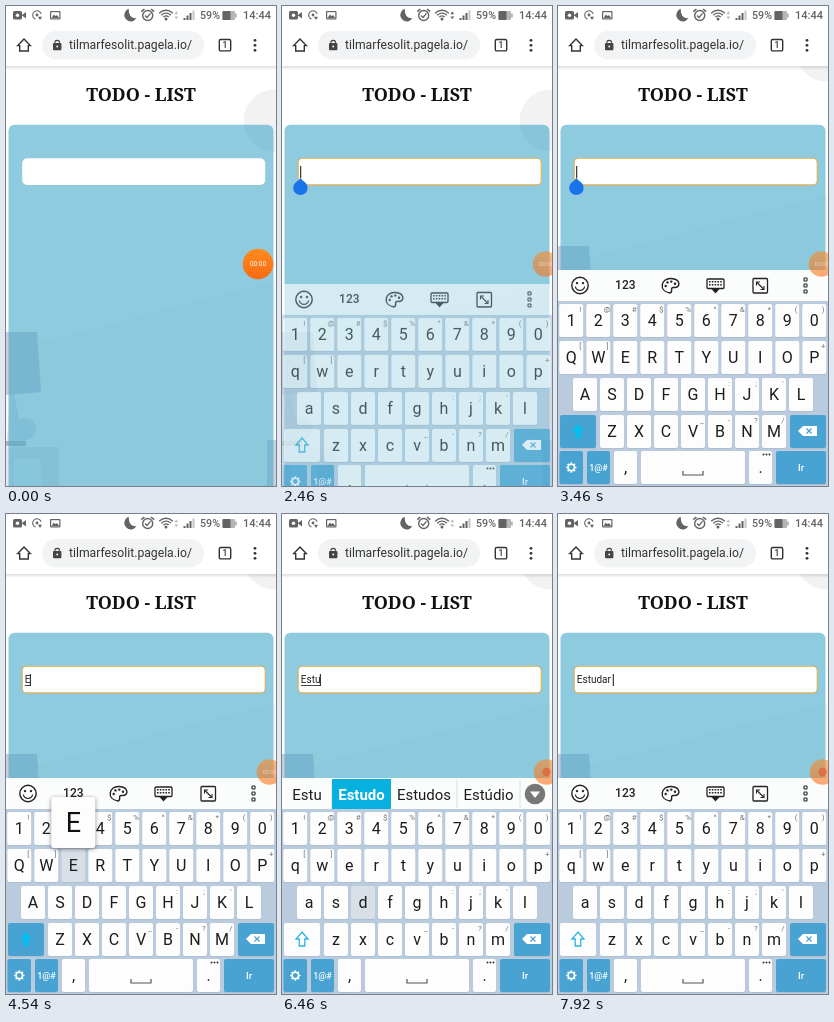
Recreate the animation shown at these times as an HTML page with a canvas. Size 270 px wide and 480 px high, loop 8 s.

```html
<!DOCTYPE html>
<html lang="pt">
<head>
<meta charset="utf-8">
<style>
html,body{margin:0;width:100%;height:100%;overflow:hidden;background:#fff}
canvas{display:block;width:270px;height:480px}
</style>
</head>
<body>
<canvas id="stage"></canvas>
<script>
const LOOP = 8000, W = 270, H = 480;
const dpr = window.devicePixelRatio || 1;
const cv = document.getElementById('stage');
const layer = document.createElement('canvas');
for (const k of [cv, layer]) { k.width = W * dpr; k.height = H * dpr; }
const main = cv.getContext('2d'), panel = layer.getContext('2d');
let c = main;

const SANS = 'Roboto, sans-serif', SERIF = '"Noto Serif", serif';
const BLUE = '#48a3d3', CYAN = '#06b1e0', GREY = '#636363', INK = '#1d1d1d';
const KEY = '#fdfdfd', PRESSED = '#d9dfe6';

// key, finger down, letter typed, finger up
const taps = [
  ['e', 4150, 4380, 4690], ['s', 5000, 5150, 5380], ['t', 5690, 5770, 5930],
  ['u', 6000, 6080, 6230], ['d', 6460, 6540, 6700], ['a', 6920, 7000, 7230],
  ['r', 7310, 7380, 7540], [' ', 7610, 7690, 7850]
];
// start time, words, cell edges, highlighted cell
const hints = [
  [4610, ['E', 'É', 'Eu', 'Em', 'Ele', 'Ela'], [0, 34, 68, 108, 150, 193, 238], 0],
  [5380, ['Es', 'És', 'Este', 'Esta', 'Está', 'Esse'], [0, 36, 72, 113, 154, 195, 238], 0],
  [6000, ['Est', 'Este', 'Esta', 'Está', 'Estou'], [0, 43, 90, 137, 184, 238], 1],
  [6310, ['Estu', 'Estudo', 'Estudos', 'Estúdio'], [0, 50, 109, 175, 238], 1],
  [6770, ['Estud', 'Estudo', 'Estudos', 'Estúdio'], [0, 50, 109, 175, 238], 1],
  [7230, ['Estuda', 'Estudar', 'Estudam'], [0, 76, 157, 238], 0],
  [7600, ['Estudar', 'Estudaram', 'Estudará'], [0, 72, 157, 238], 0]
];
const TOOLS_BACK = 7770;

const clamp = x => Math.max(0, Math.min(1, x));
const ramp = (t, a, b) => clamp((t - a) / (b - a));
const easeOut = p => 1 - (1 - p) * (1 - p);

function rect(x, y, w, h, col) { c.fillStyle = col; c.fillRect(x, y, w, h); }
function round(x, y, w, h, r, col) {
  c.beginPath(); c.roundRect(x, y, w, h, r); c.fillStyle = col; c.fill();
}
function frame(x, y, w, h, r, col, lw) {
  c.beginPath(); c.roundRect(x, y, w, h, r);
  c.strokeStyle = col; c.lineWidth = lw; c.stroke();
}
function disc(x, y, r, col) {
  c.beginPath(); c.arc(x, y, r, 0, 7); c.fillStyle = col; c.fill();
}
function ring(x, y, r, col, lw, a = 0, b = Math.PI * 2) {
  c.beginPath(); c.arc(x, y, r, a, b);
  c.strokeStyle = col; c.lineWidth = lw; c.stroke();
}
function path(pts, close) {
  c.beginPath();
  for (let i = 0; i < pts.length; i += 2) c.lineTo(pts[i], pts[i + 1]);
  if (close) c.closePath();
}
function poly(pts, col) { path(pts, true); c.fillStyle = col; c.fill(); }
function line(pts, col, lw, close) {
  path(pts, close); c.strokeStyle = col; c.lineWidth = lw; c.stroke();
}
function text(s, x, y, size, col, align = 'center', family = SANS, weight = 400) {
  c.font = `${weight} ${size}px ${family}`;
  c.textAlign = align; c.fillStyle = col; c.fillText(s, x, y);
}

function statusBar(t) {
  round(7, 5, 9, 8.5, 1.5, GREY);
  poly([16, 9, 20, 6, 20, 12.5, 16, 9.6], GREY);
  disc(11.5, 9.2, 1.7, '#fff');
  ring(31, 9, 4.3, GREY, 1.1, 1.9, 6);
  disc(31, 9, 1.4, GREY);
  poly([32, 10.8, 36, 10.8, 34, 14], GREY);
  round(44, 5, 10.5, 8.5, 1, GREY);
  rect(45.2, 6.2, 8.1, 6.1, '#fff');
  poly([45.5, 12, 48, 8.5, 49.7, 10.3, 51, 9, 53.2, 12], GREY);

  c.beginPath(); c.arc(124.8, 9, 6.5, -1.9, 0.5, true);
  c.quadraticCurveTo(122.5, 12.5, 122.7, 2.9); c.fillStyle = GREY; c.fill();
  ring(141.7, 9.5, 5, GREY, 1.4);
  line([139, 9.5, 141, 11.5, 144.5, 7.3], GREY, 1.3);
  line([135.3, 5.6, 138.4, 3], GREY, 1.6);
  line([148.1, 5.6, 145, 3], GREY, 1.6);
  for (const r of [3.6, 6.4, 9.2]) ring(160, 13.5, r, GREY, 1.4, -2.4, -0.74);
  disc(160, 13, 1.5, GREY);
  const busy = t >= 380 && t < 3380 ? '#666' : '#bbb';
  poly([168.4, 8.2, 170.3, 5.3, 172.2, 8.2], busy);
  poly([168.4, 10.4, 170.3, 13.3, 172.2, 10.4], busy);
  for (let i = 0; i < 4; i++)
    rect(177.5 + i * 3, 12 - i * 2.5, 2, 2 + i * 2.5, i < 3 ? GREY : '#c4c4c4');
  text('59%', 194, 13.4, 10.7, GREY, 'left', SANS, 500);
  round(216.5, 5, 12.5, 9, 1, '#b5b5b5');
  round(216.5, 5, 8, 9, 1, GREY);
  rect(229, 7.5, 1.8, 4, '#b5b5b5');
  text('14:44', 237, 13.4, 11, GREY, 'left', SANS, 500);
}

function addressBar() {
  line([18, 33, 24.3, 39.6, 22.3, 39.6, 22.3, 45, 13.7, 45, 13.7, 39.6, 11.7, 39.6], '#333', 1.4, true);
  round(36, 25, 162, 28.5, 14.2, '#f1f3f4');
  round(47, 37, 8.4, 7.2, 1, '#444');
  ring(51.2, 36.8, 2.4, '#444', 1.2, Math.PI, 0);
  disc(51.2, 40.6, 1, '#f1f3f4');
  c.save();
  c.beginPath(); c.rect(60, 25, 132, 28); c.clip();
  text('tilmarfesolit.pagela.io/', 63, 43.4, 12.2, '#333', 'left');
  c.restore();
  frame(213.3, 33.5, 11.4, 11.4, 1.5, '#333', 1.4);
  text('1', 219, 42.2, 8.5, '#333', 'center', SANS, 500);
  for (const y of [34.3, 39.3, 44.3]) disc(249, y, 1.4, '#333');
}

function room(dy) {
  c.save(); c.translate(0, dy);
  poly([0, 345, 270, 275, 270, 580, 0, 580], '#fafafc');
  rect(0, 441, 53, 130, '#e6e8ed');
  rect(8, 453, 27, 118, '#f2f5f7');
  poly([4, 388, 8, 388, 18, 436, 1, 436], '#dee1e8');
  c.beginPath(); c.ellipse(19, 423, 11, 11, 0, 0, 7); c.fillStyle = '#dee1e8'; c.fill();
  poly([0, 326, 31, 326, 35, 386, 0, 389], '#cacdd9');
  rect(0, 435, 20, 5, '#b4b4c1');
  rect(261, 434, 9, 150, '#cfd2dc');
  c.restore();
}

function page(t) {
  const resized = t >= 2620;
  c.save();
  c.beginPath(); c.rect(0, 60, W, H); c.clip();
  room(resized ? -86 : 0);
  if (!resized || t >= 3380) disc(268.6, resized ? 44.5 : 114.5, 31, '#f2f2f3');
  // Translucent card over the wallpaper
  round(2.5, 118.7, 265, 380, 6, 'rgba(68,168,202,.6)');
  text('TODO - LIST', 135, 95, 18, '#101010', 'center', SERIF, 700);
  const g = c.createLinearGradient(0, 60, 0, 64);
  g.addColorStop(0, 'rgba(0,0,0,.13)'); g.addColorStop(1, 'rgba(0,0,0,0)');
  rect(0, 60, W, 4, g);
  c.restore();
}

function typed(t) {
  return taps.filter(k => t >= k[2]).map(k => k[0]).join('').replace('e', 'E');
}

function cursorOn(t) {
  const last = taps.filter(k => t >= k[2]).pop();
  if (last) return (t - last[2]) % 1000 < 500;
  return t < 3000 || (t >= 3380 && t < 3920);
}

function field(t) {
  round(16.2, 152.3, 243, 26.6, 5, '#fff');
  if (t < 2080) return;
  frame(16.2, 152.3, 243, 26.6, 4, '#e5b04f', 1.1);
  const s = typed(t);
  text(s, 18.8, 169.3, 10, '#222', 'left');
  const w = c.measureText(s).width;
  if (s && !s.endsWith(' ')) rect(18.8, 171, w, 0.9, '#333');
  if (cursorOn(t)) rect(18.2 + w, 160, 1, 12, '#111');
  if (!s) {
    poly([18.4, 172, 24.3, 178.5, 12.5, 178.5], '#1a73e8');
    disc(18.4, 181.8, 7.2, '#1a73e8');
  }
}

function tools() {
  const y = 279.5;
  ring(22, y, 8.2, '#222', 1.4);
  disc(19, y - 2.4, 1.2, '#222'); disc(25, y - 2.4, 1.2, '#222');
  ring(22, y + 0.3, 4.7, '#222', 1.2, 0.15, 2.99);
  text('123', 67.3, 283.3, 12, '#222', 'center', SANS, 500);
  c.beginPath();
  c.moveTo(112, 287);
  c.bezierCurveTo(100, 285, 103, 272, 113, 272.5);
  c.bezierCurveTo(123, 273, 123, 282, 116, 281.5);
  c.bezierCurveTo(111, 281, 116, 286, 112, 287);
  c.strokeStyle = '#222'; c.lineWidth = 1.4; c.stroke();
  for (const [x, yy] of [[107.7, 280], [109.5, 276.4], [113.3, 275.6], [117, 277.7]]) disc(x, yy, 1.2, '#222');
  frame(149, 273, 17, 9.5, 1, '#222', 1.3);
  for (let i = 0; i < 5; i++) {
    rect(151 + i * 2.8, 275, 1.6, 1.5, '#222');
    rect(151 + i * 2.8, 278, 1.6, 1.5, '#222');
  }
  poly([153.5, 283, 161.5, 283, 157.5, 287.5], '#222');
  frame(195, 272.5, 14.5, 14.5, 1, '#222', 1.3);
  line([199, 276.5, 205.5, 283], '#222', 1.1);
  line([198.5, 279.5, 198.5, 276, 202, 276], '#222', 1.1);
  line([206, 280, 206, 283.5, 202.5, 283.5], '#222', 1.1);
  for (const yy of [272, 278, 284]) frame(246, yy, 3, 3, 0.5, '#222', 1.1);
}

function hintBar(h) {
  const [, words, edge, hot] = h;
  words.forEach((w, i) => {
    const on = i === hot, x = edge[i], x2 = edge[i + 1];
    if (on) rect(x, 265, x2 - x, 30, CYAN);
    else rect(x2 - 0.5, 266, 1, 28, '#d9dde1');
    text(w, (x + x2) / 2, 285.5, 15, on ? '#fff' : INK, 'center', SANS, on ? 700 : 400);
  });
  disc(253, 280, 10.3, '#777');
  poly([248, 277.5, 258, 277.5, 253, 284], '#fff');
}

const rows = [
  ['1234567890', 13.2, 298, '!@#$%^&*()'],
  ['qwertyuiop', 13.3, 335, '[]       +'],
  ['asdfghjkl', 27, 372, '     :;\' '],
  ['zxcvbnm', 54, 409, '   _-?/']
];

function key(x, y, w, col) {
  round(x, y + 0.7, w, 33, 2, '#a9bbcf');
  round(x, y, w, 33, 2, col);
}

function shiftKey(on) {
  key(2, 409, 36, on ? BLUE : KEY);
  const arrow = [20, 418, 26, 425, 22.8, 425, 22.8, 432, 17.2, 432, 17.2, 425, 14, 425];
  if (on) poly(arrow, '#05c0ef');
  else line(arrow, '#2fb4dc', 1.3, true);
}

function gear(x, y) {
  for (let i = 0; i < 8; i++) {
    const a = i * Math.PI / 4, u = Math.cos(a), v = Math.sin(a);
    line([x + u * 3, y + v * 3, x + u * 5.2, y + v * 5.2], '#fff', 1.6);
  }
  ring(x, y, 3.2, '#fff', 1.5);
}

function popup(s, x, y) {
  c.save();
  c.shadowColor = 'rgba(0,0,0,.45)'; c.shadowBlur = 4 * dpr; c.shadowOffsetY = dpr;
  round(x - 22, y - 52, 44, 51, 2.5, KEY);
  c.restore();
  text(s, x, y - 17.5, 27, '#111');
}

function keys(t) {
  const down = taps.find(k => t >= k[1] && t < k[3]);
  const upper = t >= 3000 && t < 4850;
  rect(0, 264, W, 31, '#fbfcfc');
  rect(0, 295, W, 185, '#bacbde');

  const hint = hints.filter(h => t >= h[0]).pop();
  if (hint && t < TOOLS_BACK) hintBar(hint); else tools();

  let pop = null;
  for (const [letters, x0, y, marks] of rows) {
    [...letters].forEach((ch, i) => {
      const x = x0 + 27 * i, hit = down && down[0] === ch;
      const label = upper ? ch.toUpperCase() : ch;
      key(x - 12, y, 24, hit ? PRESSED : KEY);
      text(label, x, y + 22.3, 16, INK);
      if (marks[i] !== ' ') text(marks[i], x + 9, y + 7.5, 8, '#777');
      if (hit && t >= down[2]) pop = [label, x, y];
    });
  }
  shiftKey(t >= 3380 && t < 4610);

  key(232, 409, 36, BLUE);
  poly([240, 425, 245, 420, 259, 420, 259, 430, 245, 430], '#fff');
  line([248.5, 422.5, 253.5, 427.5], BLUE, 1.3);
  line([253.5, 422.5, 248.5, 427.5], BLUE, 1.3);

  key(1.5, 445, 23.5, BLUE); gear(13.3, 461.5);
  key(29, 445, 23, BLUE);
  text('1@#', 40.5, 465, 9, '#fff', 'center', SANS, 500);
  key(56, 445, 23, KEY); text(',', 67.5, 467, 16, INK);
  key(83, 445, 104, down && down[0] === ' ' ? PRESSED : KEY);
  line([125, 465, 125, 469, 145, 469, 145, 465], '#555', 1.2);
  key(191, 445, 23, KEY); text('.', 202.5, 467, 16, INK);
  for (const x of [205.5, 208.5, 211.5]) disc(x, 448.5, 1, '#333');
  key(218, 445, 50, BLUE);
  text('Ir', 243, 465, 9.5, '#fff', 'center', SANS, 500);
  if (pop) popup(...pop);
}

// Painted on its own layer so the whole keyboard fades as one sheet.
function keyboard(t) {
  const p = ramp(t, 2230, 2690);
  if (!p) return;
  c = panel;
  c.setTransform(dpr, 0, 0, dpr, 0, 0);
  c.clearRect(0, 0, W, H);
  keys(t);
  c = main;
  c.save();
  c.globalAlpha = clamp(p * 1.3);
  c.drawImage(layer, 0, 56 * (1 - easeOut(p)), W, H);
  c.restore();
}

function bubble(t) {
  const away = ramp(t, 380, 460), slide = ramp(t, 1920, 2300), hide = ramp(t, 5690, 6000);
  const x = 252 + 3.3 * away + 8.2 * slide + hide, r = 15.3 - 1.3 * away - 1.2 * slide;
  c.save();
  c.globalAlpha = 1 - 0.42 * away;
  const g = c.createLinearGradient(0, 243, 0, 273);
  g.addColorStop(0, '#ff8b1f'); g.addColorStop(1, '#f96a12');
  disc(x, 258, r, g);
  if (hide) disc(x, 258, 4.2, '#e2502c');
  else {
    const sec = Math.max(0, Math.floor((t - 230) / 1000));
    text('00:0' + sec, x, 260.3, r * 0.42, '#fff');
  }
  c.restore();
}

function draw(t) {
  c.setTransform(dpr, 0, 0, dpr, 0, 0);
  rect(0, 0, W, H, '#fff');
  page(t);
  statusBar(t);
  addressBar();
  field(t);
  keyboard(t);
  bubble(t);
}

const start = performance.now();
function tick() {
  draw((performance.now() - start) % LOOP);
  requestAnimationFrame(tick);
}
tick();
</script>
</body>
</html>
```
